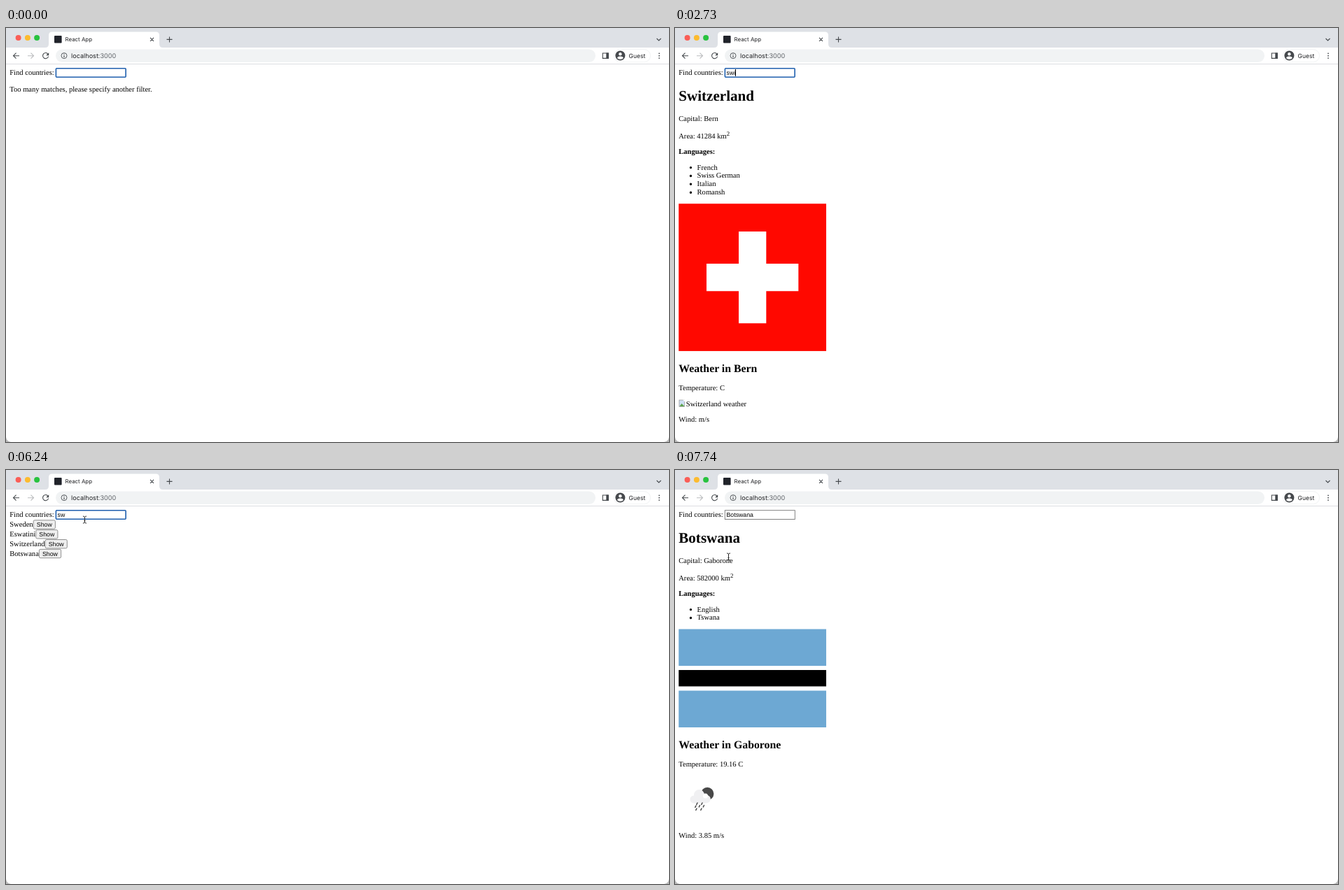
Write an HTML page that moves like this. It is 947 by 592 pixels and loops after 8000 ms.

```html
<!DOCTYPE html>
<html lang="en">
<head>
<meta charset="utf-8">
<title>Country finder</title>
<style>
html, body { margin: 0; width: 100%; height: 100%; overflow: hidden; background: #fff; }
svg { display: block; width: 947px; height: 592px; text-rendering: geometricPrecision; }
text { font: 10.54px "Liberation Serif", "Times New Roman", serif; }
.ui { font-family: Inter, sans-serif; fill: #202124; }
.form { font: 8.78px "Liberation Sans", Arial, sans-serif; }
.line { fill: none; stroke: #45494d; stroke-width: 1.1; }
.h1, .h2, .b { font-weight: bold; }
.h1 { font-size: 21.08px; }
.h2 { font-size: 15.81px; }
</style>
</head>
<body>
<svg viewBox="0 0 947 592">
  <rect width="947" height="592" fill="#fff"/>
  <rect width="947" height="28" fill="#dee1e6"/>
  <circle cx="17.6" cy="14" r="4" fill="#fa5e57"/>
  <circle cx="30.9" cy="14" r="4" fill="#fcbb2f"/>
  <circle cx="44.1" cy="14" r="4" fill="#28c23f"/>
  <path d="M56 28q5 0 5-5V10.500q0-5 5-5H214q5 0 5 5V23q0 5 5 5z" fill="#fff"/>
  <rect x="69" y="11" width="10.600" height="10.600" rx="1" fill="#20232a"/>
  <text class="ui" x="84.500" y="19" style="font-size:7.9px">React App</text>
  <path class="line" d="M206 13.900l5 5m0-5l-5 5M229.500 16.400h8m-4-4v8M929.500 15l3 3 3-3"/>
  <path class="line" d="M19 39.700h-8.500m4-4l-4 4 4 4"/>
  <path class="line" d="M31 39.700h8.500m-4-4l4 4-4 4" style="stroke:#babcbe"/>
  <path class="line" d="M60 37.200a4.100 4.100 0 1 0 .6 3.500"/>
  <path d="M61.200 35.200v4h-4z" fill="#45494d"/>
  <rect x="71" y="30.400" width="771" height="18.500" rx="9.250" fill="#f1f3f4"/>
  <circle class="line" cx="83" cy="39.600" r="4" style="stroke-width:.9"/>
  <path class="line" d="M83 39v2.900m0-5v1"/>
  <text class="ui" x="93" y="42.700" style="font-size:9.1px">localhost<tspan fill="#5f6368">:3000</tspan></text>
  <path class="line" d="M852.300 36h8v7.400h-8z"/>
  <path d="M857.300 35.500h3.500v8.400h-3.500z" fill="#45494d"/>
  <rect x="868.500" y="30.700" width="52" height="18" rx="9" fill="#fff" stroke="#f1f3f4"/>
  <circle cx="877.400" cy="39.500" r="7" fill="#46494d"/>
  <circle cx="877.400" cy="37.300" r="2.200" fill="#fff"/>
  <path d="M873.100 43.300q0-2.700 4.300-2.700t4.300 2.700q-4.300 3-8.600 0z" fill="#fff"/>
  <text class="ui" x="889.600" y="42.700" style="font-size:8.5px">Guest</text>
  <g fill="#45494d"><circle cx="933" cy="36.300" r=".9"/><circle cx="933" cy="39.700" r=".9"/><circle cx="933" cy="43.100" r=".9"/></g>
  <rect y="51" width="947" height="1" fill="#dcdee1"/>
  <text x="5.270" y="67.200">Find countries:</text>
  <g id="page"></g>
  <path d="M0 585v7h7q-6-1-7-7zM947 585v7h-7q6-1 7-7z" fill="#b9b9b9"/>
</svg>
<script>
const LOOP = 8000, LEFT = 5.27;
const page = document.getElementById('page');

const text = (x, y, s, cls = '') => `<text x="${x}" y="${y}" class="${cls}">${s}</text>`;
const rect = (x, y, w, h, fill, more = '') =>
  `<rect x="${x}" y="${y}" width="${w}" height="${h}" fill="${fill}" ${more}/>`;
const path = (d, fill, more = '') => `<path d="${d}" fill="${fill}" ${more}/>`;
const disc = (x, y, r) => `M${x - r} ${y}a${r} ${r} 0 1 1 ${2 * r} 0a${r} ${r} 0 1 1 ${-2 * r} 0z`;
const within = (t, a, b) => t >= a && t < b;
const halo = 'stroke="#fff" stroke-width="2" paint-order="stroke"';

const clouds = () =>
  path(disc(42, 557, 6.5) + disc(51, 561.5, 5) + disc(56, 566.5, 5) + 'M42 556h9l5 15.500h-14z', '#484848') +
  path(disc(22.5, 572, 6.5) + disc(33, 564, 9) + disc(45.5, 570, 8.5) + 'M22.500 567h23v11.500h-23z', '#f0f0f2', halo);

const rain = () => {
  const drops = [[32, 476], [39, 476], [30, 480], [35.5, 479.5], [41.5, 479.5], [31, 484], [38, 484]];
  return path(disc(46.2, 463, 9.2), '#484848') +
    path(disc(27, 471, 5.5) + disc(34.5, 464.5, 7.5) + disc(45, 470.5, 5.8) + 'M27 467h18v9.400h-18z', '#f0f0f2') +
    path(disc(43.5, 466, 3.5), '#fff') +
    path(drops.map(([x, y]) => `M${x} ${y}l-1.200 2.400`).join(''), 'none',
      'stroke="#484848" stroke-width="1.500" stroke-linecap="round"');
};

const swiss = {
  name: 'Switzerland', capital: 'Bern', area: 41284, temp: '-5.73', wind: '', icon: clouds,
  langs: ['French', 'Swiss German', 'Italian', 'Romansh'], flagHeight: 210.7,
  flag: y => rect(LEFT, y, 210.7, 210.7, '#ff0800') +
    path(`M91 ${y + 39.7}h39.300v46h46v39.300h-46v46h-39.300v-46h-46v-39.300h46z`, '#fff')
};
const botswana = {
  name: 'Botswana', capital: 'Gaborone', area: 582000, temp: '19.16', wind: '3.85', icon: rain,
  langs: ['English', 'Tswana'], flagHeight: 140.5,
  flag: y => rect(LEFT, y, 210.7, 52.5, '#6da8d3') + rect(LEFT, y + 58.5, 210.7, 23.4, '#000') +
    rect(LEFT, y + 88, 210.7, 52.5, '#6da8d3')
};

// stage: 0 = no weather yet, 1 = numbers, 2 = numbers and icon
function country(c, stage) {
  let y = 202.6;
  let out = text(LEFT, 104.4, c.name, 'h1') + text(LEFT, 133.1, 'Capital: ' + c.capital) +
    text(LEFT, 157.9, `Area: ${c.area} km<tspan dy="-3.500" font-size="8.780" style="font-size:8.78px">2</tspan>`) +
    text(LEFT, 180.3, 'Languages:', 'b');
  for (const lang of c.langs) {
    out += path(disc(22.5, y - 3, 1.7), '#000') + text(31.6, y, lang);
    y += 11.86;
  }
  y += 1.2;
  out += c.flag(y);
  y += c.flagHeight + 29.9;
  out += text(LEFT, y, 'Weather in ' + c.capital, 'h2');
  y += 26.2;
  out += text(LEFT, y, `Temperature: ${stage ? c.temp : ''} C`);
  if (stage === 2) out += c.icon();
  else out += rect(6, y + 14, 7.5, 9.3, '#cfe0f5', 'stroke="#9b9b9b" stroke-width=".8"') +
    path(`M6.500 ${y + 23}l3-4 4 4z`, '#5da34c') + path(`M11 ${y + 13.5}h3v3z`, '#fff') +
    text(15.8, y + 22.7, c.name + ' weather');
  return out + text(LEFT, y + (stage === 2 ? 101.5 : 45.4), `Wind: ${stage ? c.wind : ''} m/s`);
}

const rows = [['Sweden', 38.7], ['Eswatini', 42.2], ['Switzerland', 55.6], ['Botswana', 46.9]];
function list(hover, pressed) {
  return rows.map(([name, x], i) => {
    const y = 13.86 * i, last = i === 3;
    const fill = last && pressed ? '#f5f5f5' : last && hover ? '#e5e5e5' : '#efefef';
    const edge = last && pressed ? '#a5a5a5' : '#767676';
    return text(LEFT, 81 + y, name) +
      rect(x + .5, 71.8 + y, 31.2, 12.4, fill, `rx="1.800" stroke="${edge}" stroke-width=".8"`) +
      text(x + 5.1, 81 + y, 'Show', 'form');
  }).join('');
}

function input(t) {
  const value = t < 1530 ? '' : t < 2010 ? 's' : t < 2700 ? 'sw' : t < 4710 ? 'swi' : t < 7410 ? 'sw' : 'Botswana';
  const caretX = { '': 73, s: 77, sw: 84, swi: 86 }[value];
  const caretOn = [[180, 630], [1080, 1950], [2010, 2460], [2700, 3150], [3600, 4050],
    [4500, 4950], [5400, 5850], [6300, 6750]].some(([a, b]) => within(t, a, b));
  let out = t < 7200
    ? rect(71.4, 57.7, 99.7, 12.6, '#fff', 'rx="1" stroke="#1f5fae" stroke-width="1.600"')
    : rect(71.3, 57.7, 100, 12.8, '#fff', 'stroke="#767676" stroke-width=".9"');
  out += text(73.5, 67, value, 'form');
  if (within(t, 3630, 4710))
    out += path('M74 68.300H86', 'none', 'stroke="#e2463f" stroke-width="1" stroke-dasharray="1.300 .7"');
  return caretOn ? out + rect(caretX, 59, 1, 10, '#000') : out;
}

const track = [[6150, 117, 67], [6240, 112.5, 71], [6480, 92, 94], [6690, 70, 118], [6870, 62, 127],
  [6960, 62, 127], [7170, 60, 122], [7470, 60, 122], [7740, 76.5, 124]];
function pointer(t) {
  const i = track.findIndex(k => k[0] > t);
  if (i < 0) return track[track.length - 1].slice(1);
  const [t0, x0, y0] = track[i - 1], [t1, x1, y1] = track[i], f = (t - t0) / (t1 - t0);
  return [x0 + (x1 - x0) * f, y0 + (y1 - y0) * f];
}

function cursor(t, x, y) {
  let out = '';
  const ring = Math.min(1, (t - 7170) / 120, (7500 - t) / 90);
  if (ring > 0) out += path(disc(60, 122, 13), 'none', `stroke="#000" stroke-width="2" opacity="${ring}"`);
  const beam = t < 6300 || t >= 7500;
  const shape = beam
    ? path('M-2.500-5q2 0 2.500 1.200q.5-1.200 2.500-1.200M0-4v8M-2.500 5q2 0 2.500-1.200q.5 1.200 2.500 1.200M-1 1.500h2',
        'none', 'stroke="#222" stroke-width="1"')
    : path('M0 0V9.200l2-1.900 1.500 3.500 1.600-.7-1.500-3.400h2.900z', '#000', 'stroke="#fff" stroke-width=".7"');
  return out + `<g transform="translate(${x} ${y})">${shape}</g>`;
}

function render(t) {
  const [x, y] = t >= 6150 ? pointer(t) : [0, 0];
  let out = input(t);
  if (t < 2010) out += text(LEFT, 91, 'Too many matches, please specify another filter.');
  else if (within(t, 2730, 4710)) out += country(swiss, t < 3060 ? 0 : t < 3150 ? 1 : 2);
  else if (t >= 7410) out += country(botswana, t < 7560 ? 0 : t < 7620 ? 1 : 2);
  else out += list(x > 47 && x < 79 && y > 113, t >= 7200);
  if (within(t, 3150, 4710))
    out += rect(937, 52, 10, 540, '#fafafa') + rect(937, 52, .8, 540, '#e6e6e6') +
      rect(939.6, 54, 5.4, 498, '#c2c2c2', 'rx="2.700"');
  return t >= 6150 ? out + cursor(t, x, y) : out;
}

let shown = '';
function tick() {
  const next = render(performance.now() % LOOP);
  if (next !== shown) page.innerHTML = shown = next;
  requestAnimationFrame(tick);
}
tick();
</script>
</body>
</html>
```
